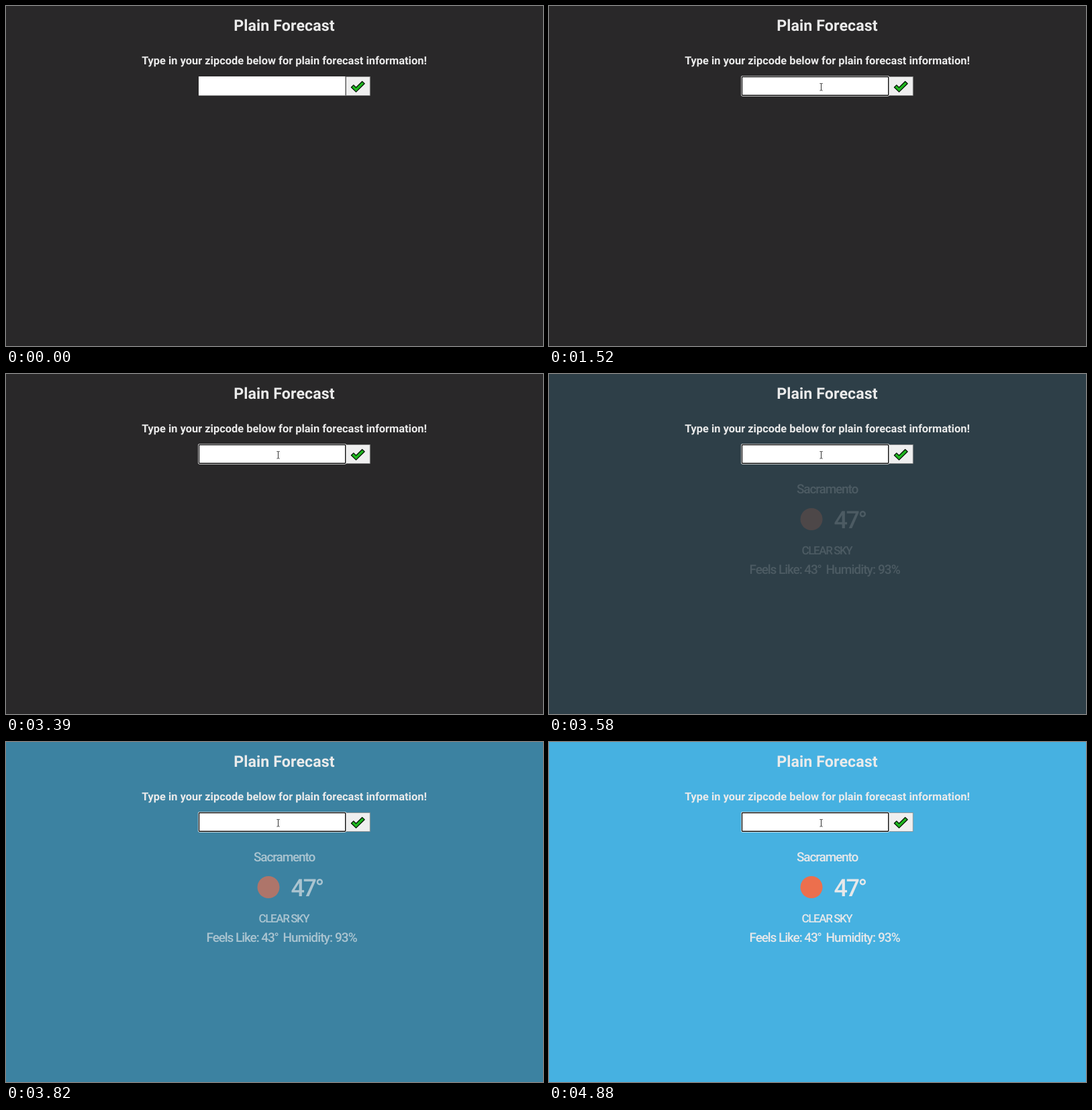
Animation of 800x507 px, one loop 4910 ms. Source, as an HTML page:

```html
<!DOCTYPE html>
<html lang="en">
<head>
<meta charset="utf-8">
<title>Plain Forecast</title>
<style>
  html, body { margin: 0; width: 100%; height: 100%; overflow: hidden; }
  body { background: #292829; }
  svg { display: block; width: 800px; height: 507px; font-family: Roboto, sans-serif; text-rendering: geometricPrecision; }
  .heading { fill: #ebebeb; font-weight: 700; text-anchor: middle; }
  #report { fill: #e6e8ea; font-size: 19px; font-weight: 500; opacity: 0; }
  #typed { font-size: 21px; letter-spacing: 0; fill: #111; }
  #typed text, #caret, #focus, #arrow, #beam { opacity: 0; }
</style>
</head>
<body>
<svg viewBox="0 0 800 507">
  <g class="heading">
    <text x="414.5" y="37" font-size="23.2" letter-spacing=".1">Plain Forecast</text>
    <text x="414.5" y="87" font-size="16.4">Type in your zipcode below for plain forecast information!</text>
  </g>

  <rect x="506.4" y="105.4" width="35.8" height="28" fill="#efefef" stroke="#8a8a8a" stroke-width=".8"/>
  <rect x="287" y="105" width="219" height="28.5" fill="#fff"/>
  <path d="M506 105v28.5" stroke="#444"/>
  <path d="M514.4 121.3l3.4-3.4 3.7 3.6 9.1-9 3.5 3.3-12.6 12.3z" fill="#1fb81f" stroke="#061506" stroke-width="1.3" stroke-linejoin="round"/>
  <g id="focus">
    <rect x="286.4" y="104.4" width="220.4" height="29.9" rx="2" fill="#fff" stroke="#fff" stroke-width=".8"/>
    <rect x="287.5" y="105.5" width="218.2" height="27.7" rx="1" fill="none" stroke="#101010" stroke-width="1.4"/>
  </g>
  <g id="typed"></g>
  <path id="caret" d="M290 109v21" stroke="#333" stroke-width=".8"/>

  <g id="report">
    <text x="369" y="177.5" letter-spacing="-1.15">Sacramento</text>
    <circle cx="391" cy="216.5" r="16.5" fill="#ec6f4d"/>
    <text x="424.5" y="229.5" font-size="36" letter-spacing="-2.5">47°</text>
    <text x="376.5" y="269" font-size="17" letter-spacing="-1.4">CLEAR SKY</text>
    <text x="298.5" y="298" letter-spacing="-1.1">Feels Like: 43°</text>
    <text x="412.5" y="298" letter-spacing="-.9">Humidity: 93%</text>
  </g>

  <path id="arrow" d="M0 0v13l3-3 2.2 5 2-1-2.2-4.8h4.2z" fill="#fff" stroke="#111" stroke-width=".8"/>
  <path id="beam" d="M403.5 115.5h1.5l.5.5.5-.5h1.5M405.5 116v9.5M403.5 126h1.5l.5-.5.5.5h1.5" fill="none" stroke="#333"/>
</svg>
<script>
const LOOP = 4910, CLICK = 900, CLEAR = 2850, BLINK = 530, DIGIT = 9.7;
const keys = [[2060, "9"], [2180, "4"], [2300, "2"], [2480, "0"], [2640, "3"]];
const el = id => document.getElementById(id);
const start = document.timeline.currentTime ?? 0;

// Each step is [time, value, easing]; steps without easing hold until the next one.
function play(node, prop, steps) {
  const all = [...steps, [LOOP, steps[steps.length - 1][1]]];
  node.animate(
    all.map(([time, value, easing = "step-end"]) => ({ offset: time / LOOP, [prop]: value, easing })),
    { duration: LOOP, iterations: Infinity }
  ).startTime = start;
}

// Pointer
play(el("arrow"), "opacity", [[0, 0], [60, 1], [610, 0]]);
play(el("arrow"), "transform", [
  [0, "translate(800px, 500px)"],
  [60, "translate(800px, 500px)", "cubic-bezier(.3, .1, .4, 1)"],
  [610, "translate(405px, 117px)"]
]);
play(el("beam"), "opacity", [[0, 0], [610, 1]]);

// Input
play(el("focus"), "opacity", [[0, 0], [CLICK, 1]]);
keys.forEach(([time, digit], i) => {
  const text = document.createElementNS("http://www.w3.org/2000/svg", "text");
  text.textContent = digit;
  text.setAttribute("x", 288.3 + i * DIGIT);
  text.setAttribute("y", 127);
  el("typed").append(text);
  play(text, "opacity", [[0, 0], [time, 1], [CLEAR, 0]]);
});
play(el("caret"), "transform", [
  [0, "translateX(0px)"],
  ...keys.map(([time], i) => [time, `translateX(${(i + 1) * DIGIT - 1}px)`]),
  [CLEAR, "translateX(0px)"]
]);
play(el("caret"), "opacity", [
  [0, 0], [CLICK, 1], [CLICK + BLINK, 0], [CLICK + 2 * BLINK, 1],
  [CLEAR + BLINK, 0], [CLEAR + 2 * BLINK, 1], [CLEAR + 3 * BLINK, 0]
]);

// Weather fades in
const fade = (node, prop, from, to) => play(node, prop, [[0, from], [3440, from, "ease"], [4440, to]]);
fade(document.body, "backgroundColor", "#292829", "#46b1e1");
fade(el("report"), "opacity", 0, 1);
</script>
</body>
</html>
```
